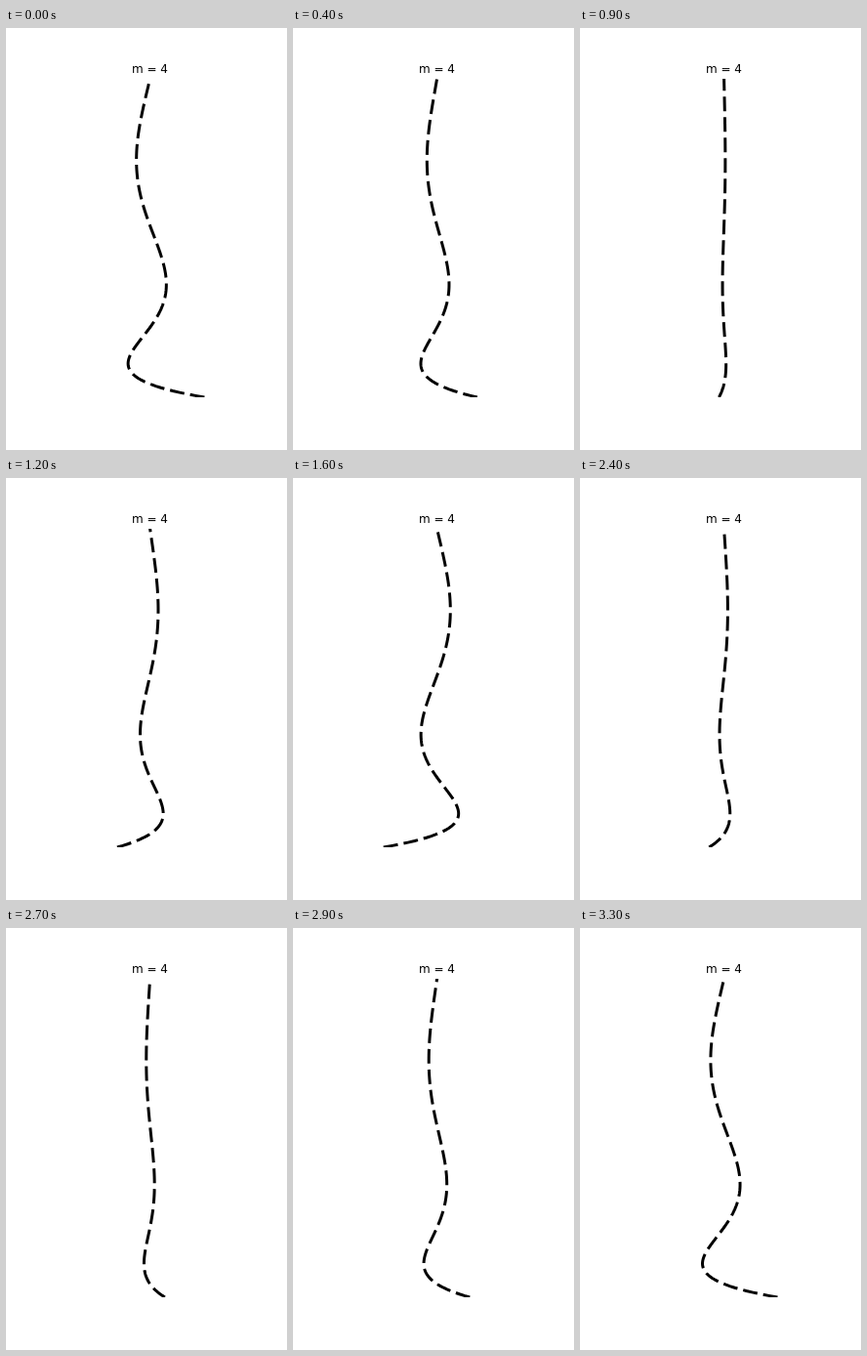
An HTML page with a canvas that plays this animation: 288 px wide and 432 px high, repeating every 3400 ms.

```html
<!DOCTYPE html>
<html lang="en">
<head>
<meta charset="utf-8">
<title>Hanging chain, mode 4</title>
<style>
  html, body { margin: 0; width: 288px; height: 432px; overflow: hidden; background: #fff; }
  canvas { display: block; }
</style>
</head>
<body>
<canvas id="stage" width="288" height="432"></canvas>
<script>
const ctx = document.getElementById('stage').getContext('2d');
const MODE = 4, ROOT = 11.79153444;          // fourth zero of J0
const TOP = 51.84, BOTTOM = 378, MID = 147.6, AMP = 55.8;
const STEPS = 34, STEP_MS = 100, POINTS = 200;

// Bessel J0 from its integral, midpoint rule
function j0(z) {
  const n = 32;
  let sum = 0;
  for (let i = 0; i < n; i++) sum += Math.cos(z * Math.sin(Math.PI * (i + 0.5) / n));
  return sum / n;
}

// Mode shape, from the free lower end to the fixed upper end
const shape = Array.from({ length: POINTS + 1 }, (_, i) => {
  const h = i / POINTS;
  return { u: AMP * j0(ROOT * Math.sqrt(h)), y: BOTTOM - h * (BOTTOM - TOP) };
});

function draw(step) {
  const swing = Math.cos(2 * Math.PI * step / STEPS);
  ctx.fillStyle = '#fff';
  ctx.fillRect(0, 0, 288, 432);
  ctx.fillStyle = '#000';
  ctx.font = '12px "DejaVu Sans", sans-serif';
  ctx.fillText('m = ' + MODE, 129, 46);

  ctx.save();
  ctx.beginPath();
  ctx.rect(36, 52, 223, 326);
  ctx.clip();
  ctx.beginPath();
  for (const p of shape) ctx.lineTo(MID + swing * p.u, p.y);
  ctx.lineWidth = 3;
  ctx.lineJoin = 'round';
  ctx.setLineDash([15, 6]);
  ctx.stroke();
  ctx.restore();
}

const start = performance.now();
function tick() {
  draw(Math.floor((performance.now() - start) / STEP_MS) % STEPS);
  requestAnimationFrame(tick);
}
tick();
</script>
</body>
</html>
```
